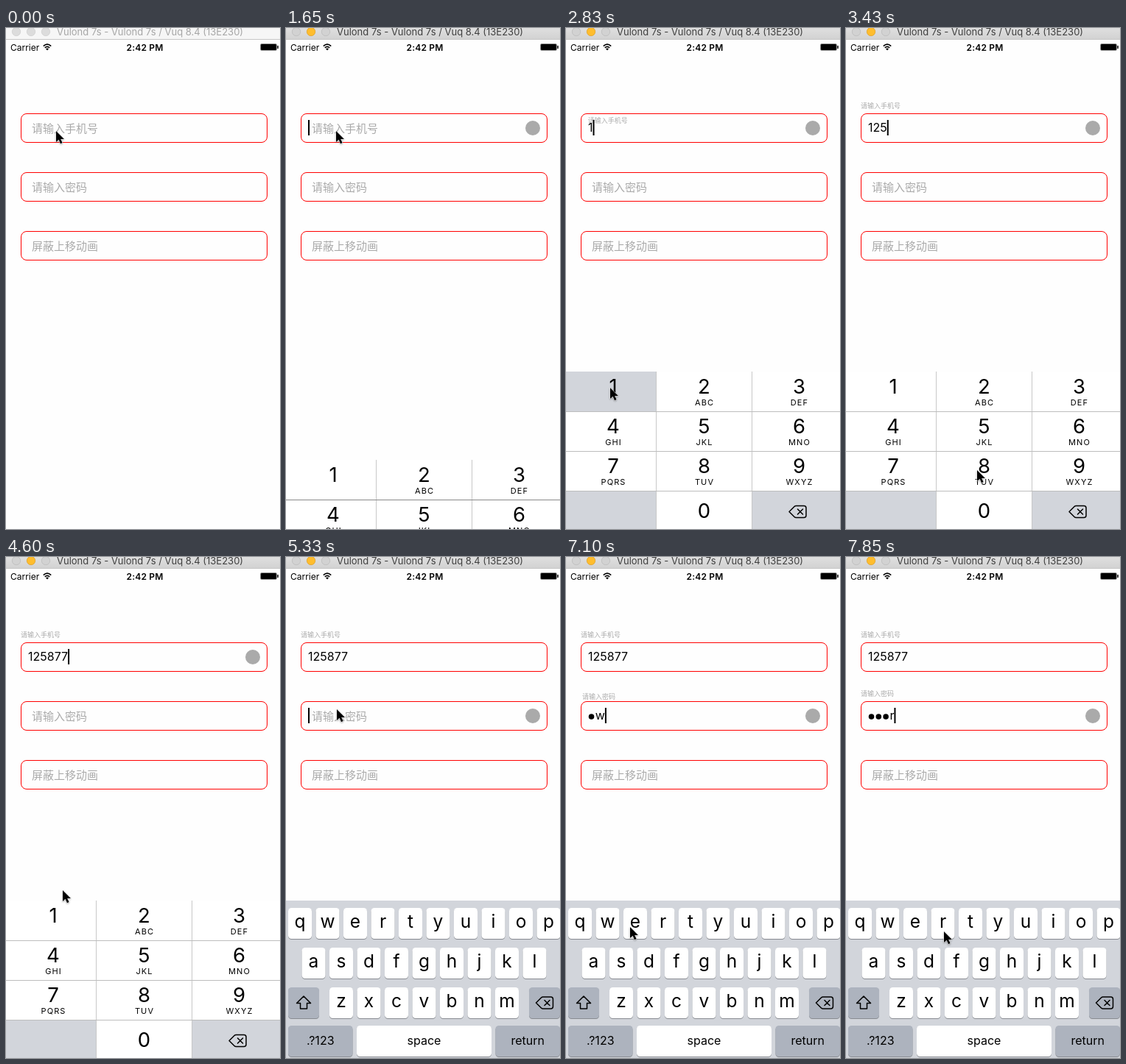
An HTML page for the animation above (7.99 s loop, 372x681 px).

```html
<!DOCTYPE html>
<html lang="zh">
<head>
<meta charset="utf-8">
<title>Floating placeholders</title>
<style>
html, body { margin: 0; width: 100%; height: 100%; overflow: hidden; background: #fefefe; }
svg { display: block; width: 372px; height: 681px; }
text { font-family: Inter, Roboto, sans-serif; white-space: pre; }
.mid { text-anchor: middle; }
.hint { font-family: "Noto Sans CJK SC", "Noto Sans CJK", sans-serif; font-size: 15px; fill: #aaa; }
.hint.small { font-size: 9px; }
.entry { font-size: 16px; }
.digit { font-size: 27.5px; }
.abc { font-size: 11px; letter-spacing: 1.1px; }
.letter { font-size: 24.5px; }
.word { font-size: 16px; }
.line { fill: none; stroke: #000; stroke-width: 1.5; stroke-linejoin: round; stroke-linecap: round; }
#bar rect { fill: #f6f6f6; }
#bar text { font-size: 13px; fill: #a6a6a6; }
#bar circle { fill: #dcdcdc; stroke: #d0d0d0; stroke-width: .8; }
#bar.on rect { fill: url(#chrome); }
#bar.on text { fill: #3f3f3f; }
#bar.on circle { fill: #d2d2d2; stroke: #bdbdbd; }
#bar.on .min { fill: #ffbd2e; stroke: #e0a22a; }
</style>
</head>
<body>
<svg id="stage" viewBox="0 0 372 681"></svg>
<script>
const LOOP = 7990, STEP = 148;
const PAD_Y = 467, GRAY = '#d2d5db', DARK = '#adb3be';
const HINTS = ['请输入手机号', '请输入密码', '屏蔽上移动画'];
const LETTERS = ['', 'ABC', 'DEF', 'GHI', 'JKL', 'MNO', 'PQRS', 'TUV', 'WXYZ'];
const COLS = [[0, 122, 64], [123, 129, 187.5], [253, 119, 316.5]];

// Steps at which each character lands
const ENTRIES = [
  { chars: '125877', at: [19, 21, 22, 25, 28, 30], from: 11, to: 34 },
  { chars: 'wwer', at: [46, 47, 49, 52], from: 34, to: 99 }
];

// Pointer way-points: step, x, y
const PATH = [
  [0, 68, 140], [11, 68, 140], [12, 70, 170], [13, 80, 290], [14, 86, 397],
  [15, 84, 455], [16, 72, 482], [18, 60, 489], [19, 60, 489], [20, 120, 491],
  [21, 178, 491], [22, 178, 545], [23, 178, 601], [25, 178, 601], [27, 78, 599],
  [28, 63, 597], [30, 63, 594], [31, 77, 453], [32, 74, 320], [33, 70, 222],
  [34, 69, 207], [37, 69, 207], [38, 70, 216], [39, 80, 290], [40, 94, 400],
  [41, 99, 492], [42, 90, 536], [43, 68, 515], [44, 52, 503], [47, 52, 503],
  [48, 87, 503], [49, 88, 503], [51, 130, 508], [52, 133, 509], [54, 133, 509]
];

const rect = (x, y, w, h, fill, more = '') =>
  `<rect x="${x}" y="${y}" width="${w}" height="${h}" fill="${fill}" ${more}/>`;
const text = (x, y, cls, s, more = '') =>
  `<text x="${x}" y="${y}" class="${cls}" ${more}>${s}</text>`;
const path = (d, more) => `<path d="${d}" ${more}/>`;

const key = (x, y, w, fill = '#fff') =>
  rect(x, y + 1, w, 42, '#888b91', 'rx="4.5"') + rect(x, y, w, 42, fill, 'rx="4.5"');

const erase = (x, y) => path(
  'M-11.5 0L-4.5 -7Q-3.5 -8 -2 -8H8.5Q11.5 -8 11.5 -5V5Q11.5 8 8.5 8H-2Q-3.5 8 -4.5 7ZM0 -3.5L7 3.5M7 -3.5L0 3.5',
  `class="line" transform="translate(${x} ${y})"`);

function titleBar() {
  const dots = [14, 34, 54].map((x, i) =>
    `<circle cx="${x}" cy="5" r="5.7" class="${i === 1 ? 'min' : ''}"/>`).join('');
  return `<g id="bar">${rect(0, 0, 372, 15, '')}${dots}` +
    text(69, 10, '', 'Vulond 7s - Vulond 7s / Vuq 8.4 (13E230)') + '</g>' +
    rect(0, 15, 372, 1, '#c6c6c6');
}

function statusBar() {
  return text(6, 30.5, '', 'Carrier', 'font-size="12"') +
    path('M50.8 24.6Q56 19.8 61.2 24.6M52.8 26.9Q56 24 59.2 26.9', 'fill="none" stroke="#000" stroke-width="1.6"') +
    path('M54 28.2Q56 26.8 58 28.2L56 30.4Z', '') +
    text(188.5, 30.5, 'mid', '2:42 PM', 'font-size="12" font-weight="600" letter-spacing=".2"') +
    rect(345.5, 21.5, 22, 9, 'none', 'rx="1.5" stroke="#999"') +
    rect(346, 22, 21, 8, '#000', 'rx="1"') + rect(368.3, 24, 1.5, 4, '#000');
}

function field(hint, i) {
  const y = 116 + 80 * i;
  return rect(20.5, y + .5, 334, 39, 'none', 'rx="7.5" stroke="#f00"') +
    text(35, y + 25.5, 'hint', hint, `id="hint${i}"`) +
    `<g id="dots${i}"></g>` + text(30, y + 25.2, 'entry', '', `id="entry${i}"`) +
    `<circle id="clear${i}" cx="335" cy="${y + 20}" r="10" fill="#aaa"/>` +
    rect(30, y + 9, 2, 21, '#000', `id="caret${i}"`);
}

function numberPad() {
  let out = rect(0, PAD_Y, 372, 214, '#fff');
  for (let n = 0; n < 9; n++) {
    const [x, w, mid] = COLS[n % 3], y = PAD_Y + 54 * Math.floor(n / 3);
    out += rect(x, y, w, 54, '#fff', `id="key${n + 1}"`) +
      text(mid, y + 30, 'digit mid', n + 1) + text(mid + .5, y + 45.5, 'abc mid', LETTERS[n]);
  }
  out += rect(0, 629, 122, 52, GRAY) + rect(253, 629, 119, 52, GRAY) +
    text(187.5, 666, 'digit mid', 0) + erase(314.5, 657.5);
  const rows = [521, 575, 629].map(y => rect(0, y, 372, 1, 'inherit')).join('').replace(/fill="inherit"/g, '');
  return `<g id="pad">${out}${rect(122, PAD_Y, 1, 214, '#c8c8c8')}${rect(252, PAD_Y, 1, 214, '#c8c8c8')}` +
    `<g id="rules">${rows}</g></g>`;
}

function letterPad() {
  let out = rect(0, PAD_Y, 372, 214, GRAY);
  [['qwertyuiop', 3], ['asdfghjkl', 21.5], ['zxcvbnm', 59]].forEach(([row, x0], r) => {
    [...row].forEach((c, i) => {
      const x = x0 + 37.5 * i, y = 477 + 54 * r;
      out += key(x, y, 32) + text(x + 16, y + 27, 'letter mid', c);
    });
  });
  out += key(3, 585, 42, DARK) + key(330, 585, 42, DARK) + erase(351, 606) +
    path('M24 597L33.5 606.5H28.5V614H19.5V606.5H14.5Z', 'class="line"');
  [[3, 87.5, DARK, '.?123'], [96, 183, '#fff', 'space'], [284.5, 87.5, DARK, 'return']]
    .forEach(([x, w, fill, s]) => {
      out += key(x, 637, w, fill) + text(x + w / 2, 663.3, 'word mid', s);
    });
  return `<g id="letters">${out}</g>`;
}

const arrow = '<g id="arrow">' +
  path('M0 0V15L3.6 11.8L6 17.2L8.6 16.1L6.2 10.9H11Z', 'fill="#000" stroke="#fff" stroke-width="1" paint-order="stroke" style="filter:drop-shadow(0 1px 1px #0005)"') + '</g>';

document.getElementById('stage').innerHTML =
  '<defs><linearGradient id="chrome" x2="0" y2="1"><stop stop-color="#dfdfdf"/><stop offset="1" stop-color="#d2d2d2"/></linearGradient></defs>' +
  rect(0, 0, 372, 681, '#fefefe') + titleBar() + statusBar() +
  HINTS.map(field).join('') + numberPad() + letterPad() + arrow;

const $ = id => document.getElementById(id);
const show = (id, on) => $(id).setAttribute('visibility', on ? 'visible' : 'hidden');

function drawEntry(s, i) {
  const e = ENTRIES[i] || { chars: '', at: [], from: 99, to: 99 };
  const y = 116 + 80 * i, n = e.at.filter(a => a <= s).length;
  const focus = s >= e.from && s < e.to;
  const masked = i === 1 ? Math.max(0, n - 1) : 0;
  const x = 30 + 9.8 * masked;

  const entry = $('entry' + i);
  entry.textContent = e.chars.slice(masked, n);
  entry.setAttribute('x', x);
  $('dots' + i).innerHTML = Array.from({ length: masked }, (_, k) =>
    `<circle cx="${34.5 + 9.8 * k}" cy="${y + 21}" r="3.8"/>`).join('');

  // Caret blinks, restarting at each keystroke
  const last = n ? e.at[n - 1] : e.from;
  $('caret' + i).setAttribute('x', x + (n ? entry.getComputedTextLength() : 0));
  show('caret' + i, focus && (s - last) % 7 < 4);
  show('clear' + i, focus);

  const p = n ? 1 - Math.pow(1 - Math.min(1, (s - e.at[0] + 1) / 4), 1.5) : 0;
  const hint = $('hint' + i);
  hint.classList.toggle('small', n > 0);
  hint.setAttribute('x', 35 - 15 * p);
  hint.setAttribute('y', y + (n ? 23.3 - 30 * p : 25.5));
}

function draw(s) {
  $('bar').classList.toggle('on', s >= 6);
  HINTS.forEach((_, i) => drawEntry(s, i));

  show('pad', s >= 11 && s < 34);
  show('letters', s >= 34);
  const slide = s < 12 ? 120 : s < 13 ? 14 : 0;
  $('pad').setAttribute('transform', `translate(0 ${slide})`);
  $('rules').setAttribute('fill', s < 16 ? '#8a8a8a' : '#bdbdbd');
  const hit = ENTRIES[0].chars[ENTRIES[0].at.indexOf(s)];
  for (let n = 1; n < 10; n++) $('key' + n).setAttribute('fill', +hit === n ? GRAY : '#fff');

  const k = PATH.findIndex(q => q[0] > s);
  const [s0, x0, y0] = PATH[k - 1], [s1, x1, y1] = PATH[k];
  const f = (s - s0) / (s1 - s0);
  $('arrow').setAttribute('transform', `translate(${x0 + (x1 - x0) * f} ${y0 + (y1 - y0) * f})`);
}

let shown = -1;
function tick() {
  const s = Math.min(53, Math.floor((performance.now() % LOOP + 5) / STEP));
  if (s !== shown) draw(shown = s);
  requestAnimationFrame(tick);
}
tick();
</script>
</body>
</html>
```
